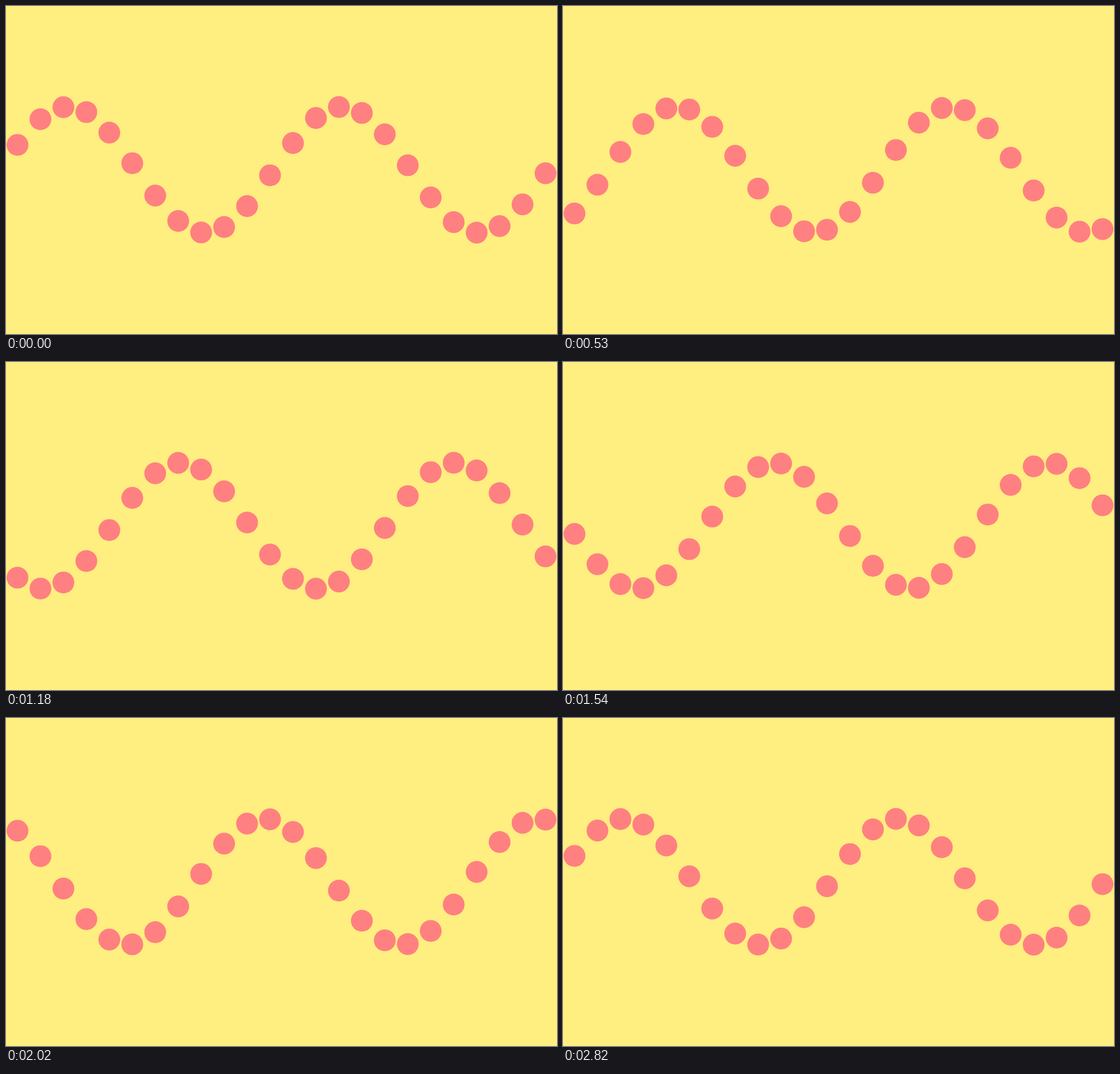
Recreate the animation shown at these times as an HTML page without scripts. Size 970 px wide and 577 px high, loop 2850 ms.

```html
<!DOCTYPE html>
<html lang="en">
<head>
<meta charset="utf-8">
<title>Dot wave</title>
<style>
  @property --phase {
    syntax: "<number>";
    inherits: true;
    initial-value: 0.406;
  }

  html, body {
    margin: 0;
    width: 100%;
    height: 100%;
    overflow: hidden;
    background: #ffee80;
  }

  svg {
    display: block;
    width: 970px;
    height: 577px;
    animation: travel 2850ms -5ms infinite;
  }

  /* Each dot rides the same sine wave, offset by its index. */
  circle {
    r: 19.2px;
    fill: #ff8080;
    transform: translate(
      calc((var(--i) + 0.5) * 970px / 24),
      calc(288.1px - 110.8px * sin(var(--phase) + var(--i) * 0.5263))
    );
  }

  /* Stepped phase, with a brief hitch near 1.18 s. */
  @keyframes travel {
    0%         { --phase: 0.406;  animation-timing-function: steps(12); }
    18.596491% { --phase: -0.766; animation-timing-function: steps(14); }
    40%        { --phase: -2.114; animation-timing-function: steps(1); }
    41.403509% { --phase: -2.173; animation-timing-function: steps(1); }
    42.807018% { --phase: -2.294; animation-timing-function: steps(8); }
    54.035088% { --phase: -3.011; animation-timing-function: steps(12); }
    70.877193% { --phase: -4.086; animation-timing-function: steps(12); }
    87.719298% { --phase: -5.155; animation-timing-function: steps(8); }
    98.947368%, 100% { --phase: -5.86; animation-timing-function: steps(1); }
  }
</style>
</head>
<body>
<svg viewBox="0 0 970 577" aria-hidden="true">
  <circle style="--i:0"/>
  <circle style="--i:1"/>
  <circle style="--i:2"/>
  <circle style="--i:3"/>
  <circle style="--i:4"/>
  <circle style="--i:5"/>
  <circle style="--i:6"/>
  <circle style="--i:7"/>
  <circle style="--i:8"/>
  <circle style="--i:9"/>
  <circle style="--i:10"/>
  <circle style="--i:11"/>
  <circle style="--i:12"/>
  <circle style="--i:13"/>
  <circle style="--i:14"/>
  <circle style="--i:15"/>
  <circle style="--i:16"/>
  <circle style="--i:17"/>
  <circle style="--i:18"/>
  <circle style="--i:19"/>
  <circle style="--i:20"/>
  <circle style="--i:21"/>
  <circle style="--i:22"/>
  <circle style="--i:23"/>
</svg>
</body>
</html>
```
